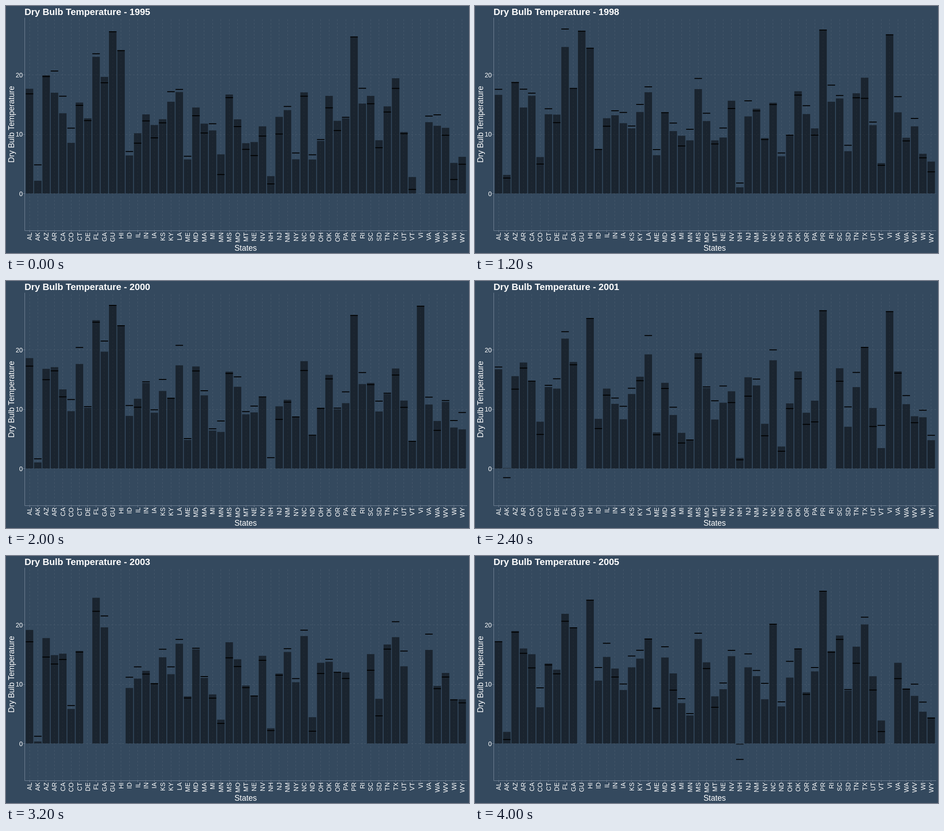
An HTML page for the animation above (4.4 s loop, 1025 by 547 pixels).

```html
<!DOCTYPE html>
<html lang="en">
<head>
<meta charset="utf-8">
<title>Dry Bulb Temperature</title>
<style>
  html, body { margin: 0; width: 100%; height: 100%; overflow: hidden; background: #34495e; }
  svg { display: block; width: 1025px; height: 547px; }
  text { font-family: "Liberation Sans", Arial, sans-serif; font-size: 14px; fill: #fff; }
  #title { font-size: 20.55px; font-weight: bold; }
  .name { font-size: 17.5px; }
  .end { text-anchor: end; }
  .mid { text-anchor: middle; }
  path { fill: none; }
  #grid { stroke: #46596c; stroke-dasharray: 4 4; }
  #axes { stroke: #77869a; }
  #bars { fill: #000; fill-opacity: .5; }
  #marks { stroke: #000; stroke-width: 2; }
</style>
</head>
<body>
<svg viewBox="0 0 1025 547">
  <path id="grid"/>
  <path id="bars"/>
  <path id="marks"/>
  <path id="axes"/>
  <g id="labels"></g>
  <text id="title" x="41" y="20"></text>
  <text class="name mid" x="530.5" y="542">States</text>
  <text class="name mid" transform="translate(18 262) rotate(-90)">Dry Bulb Temperature</text>
</svg>
<script>
const $ = id => document.getElementById(id);
const states = ('AL AK AZ AR CA CO CT DE FL GA GU HI ID IL IN IA KS KY LA ME MD MA MI MN MS MO MT ' +
  'NE NV NH NJ NM NY NC ND OH OK OR PA PR RI SC SD TN TX UT VT VI VA WA WV WI WY').split(' ');

// Typical temperature of each climate zone, warmest first.
const zones = [
  [26.7, 'GU PR VI'], [25, 'HI'], [22, 'FL'], [19.5, 'TX'], [18, 'AL AZ GA LA MS NC'],
  [16.2, 'AR SC'], [15, 'CA CT MD OK TN'], [13.8, 'KY MO NV NM RI VA'], [12.5, 'IL IN KS NJ'],
  [11, 'DE MA OH OR PA UT WV'], [10, 'IA NE WA'], [8.1, 'ID MI MT NY SD'], [7, 'CO ME WI'],
  [5.9, 'MN ND WY'], [4, 'VT'], [2, 'AK NH']
];
// States without readings in a year.
const gaps = {
  1995: 'VI', 1997: 'PR RI VI', 1999: 'DE', 2001: 'GU RI', 2002: 'DE PR VI',
  2003: 'DE GU HI PR RI VT VI', 2005: 'GU VI'
};

const FIRST = 1995, YEARS = 11, HOLD = 400;
const LEFT = 41, RIGHT = 1021, TOP = 26, BOTTOM = 497.5;
const STEP = (RIGHT - LEFT) / (states.length + .2), WIDTH = STEP * .9;
const xAt = i => LEFT + (i + .6) * STEP;
const yAt = t => 415.3 - t * 13.12;

const climate = {};
for (const [temp, names] of zones) for (const s of names.split(' ')) climate[s] = temp;

function seeded(seed) {
  return () => {
    seed = seed + 0x6D2B79F5 | 0;
    let t = Math.imul(seed ^ seed >>> 15, 1 | seed);
    t = t + Math.imul(t ^ t >>> 7, 61 | t) ^ t;
    return ((t ^ t >>> 14) >>> 0) / 4294967296;
  };
}

// Mean and median of every state; the tropics hardly vary.
function readings(year) {
  const rand = seeded(year), swing = () => rand() + rand() - 1;
  return states.map((s, i) => {
    const tropic = climate[s] >= 25;
    const mean = climate[s] + swing() * (tropic ? 1.2 : 3.2);
    const median = mean + swing() * (tropic ? 0 : 4);
    return { s, i, mean, median };
  }).filter(r => !(gaps[year] || '').includes(r.s));
}

const bar = r => `M${xAt(r.i) - WIDTH / 2} ${yAt(0)}V${yAt(r.mean)}h${WIDTH}V${yAt(0)}z`;
const mark = r => `M${xAt(r.i) - WIDTH / 2} ${yAt(r.median)}h${WIDTH}`;

function drawFrame() {
  let grid = '', axes = `M${LEFT + .5} ${TOP}V${BOTTOM}H${RIGHT}`, labels = '';
  for (const t of [0, 10, 20]) {
    const y = Math.floor(yAt(t)) + .5;
    grid += `M${LEFT} ${y}H${RIGHT}`;
    axes += `M${LEFT - 3} ${y}h3`;
    labels += `<text class="end" x="37" y="${yAt(t) + 5.3}">${t}</text>`;
  }
  states.forEach((s, i) => {
    const x = Math.floor(xAt(i)) + .5;
    grid += `M${x} ${BOTTOM}V${TOP}`;
    axes += `M${x} ${BOTTOM}v3`;
    labels += `<text class="end" transform="translate(${xAt(i) + 5} 501.5) rotate(-90)">${s}</text>`;
  });
  $('grid').setAttribute('d', grid);
  $('axes').setAttribute('d', axes);
  $('labels').innerHTML = labels;
}

function show(year) {
  const rows = readings(year);
  $('title').textContent = `Dry Bulb Temperature - ${year}`;
  $('bars').setAttribute('d', rows.map(bar).join(''));
  $('marks').setAttribute('d', rows.map(mark).join(''));
}

let shown;
function tick() {
  const year = FIRST + Math.floor(performance.now() / HOLD) % YEARS;
  if (year !== shown) show(shown = year);
  requestAnimationFrame(tick);
}

drawFrame();
tick();
</script>
</body>
</html>
```
